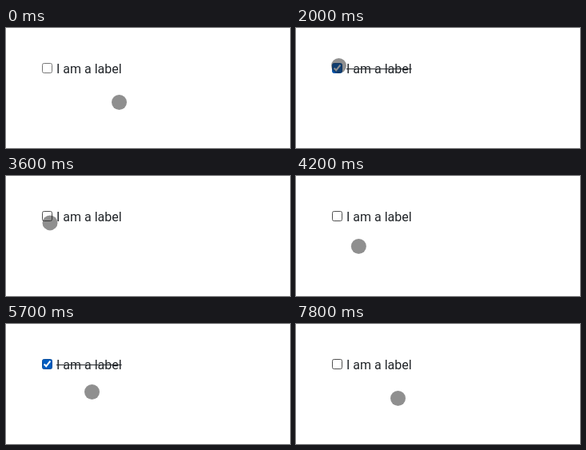
An HTML page for the animation above (8000 ms loop, 355 by 151 pixels).

```html
<!DOCTYPE html>
<html lang="en">
<head>
<meta charset="utf-8">
<title>Checkbox</title>
<style>
  html, body { margin: 0; width: 100%; height: 100%; overflow: hidden; background: #fff; }
  svg { position: absolute; left: 0; top: 0; width: 355px; height: 151px; }
  #label { position: absolute; left: 63px; top: 42px; font: 16px/19px Roboto, sans-serif; color: #212529; white-space: nowrap; }
</style>
</head>
<body>
<span id="label">I am a label</span>
<svg viewBox="0 0 355 151">
  <g transform="translate(45 44)">
    <rect id="box" x=".5" y=".5" width="12" height="12" rx="2"/>
    <path id="tick" d="M2.6 6.5l2.6 2.6L10.4 2.6" fill="none" stroke="#fff" stroke-width="2.08"/>
  </g>
  <circle id="touch" r="9.5" fill="#202020" fill-opacity=".5"/>
</svg>
<script>
const LOOP = 8000, STEP = 100;
const $ = id => document.getElementById(id);
const box = $('box'), tick = $('tick'), label = $('label'), touch = $('touch');

const home = { x: 141.5, y: 93.5 };
const low = { x: 76.5, y: 91.5 };

// The pointer glides to each point in the given number of steps, then rests.
const moves = [
  { at: 500, steps: 3, x: 81.5, y: 80.5 },
  { at: 900, steps: 3, x: 36.5, y: 43.5 },
  { at: 1200, steps: 2, x: 53.5, y: 47.5 },
  { at: 2100, steps: 1, ...low },
  { at: 2700, steps: 1, x: 56.5, y: 66.5 },
  { at: 2900, steps: 4, x: 47.5, y: 47.5 },
  { at: 3600, steps: 3, ...low },
  { at: 4200, steps: 6, x: 101.5, y: 51.5 },
  { at: 5400, steps: 2, x: 107.5, y: 85.5 },
  { at: 6100, steps: 6, x: 113.5, y: 52.5 },
  { at: 7100, steps: 3, x: 126.5, y: 88.5 },
  { at: 7800, steps: 1, x: 127.5, y: 93.5 }
];
const clicks = [2000, 3500, 5300, 7000];
const pressStart = 6800, pressEnd = 7000;

const ease = p => p * p * (3 - 2 * p);
const mix = (a, b, p) => a + (b - a) * p;

function touchAt(t) {
  const i = moves.findLastIndex(m => m.at <= t);
  if (i < 0) return home;
  const to = moves[i], from = moves[i - 1] || home;
  const step = Math.floor((t - to.at) / STEP) + 1;
  const p = ease(Math.min(1, step / to.steps));
  return { x: mix(from.x, to.x, p), y: mix(from.y, to.y, p) };
}

function draw(now) {
  const t = now % LOOP;
  const checked = clicks.filter(c => c <= t).length % 2 === 1;
  const pressed = t >= pressStart && t < pressEnd;
  const hovered = t >= clicks[0];
  const blue = pressed ? '#378cff' : '#005cc0';
  const edge = pressed ? blue : '#0b4f9f';
  const border = hovered ? '#4f4f4f' : '#767676';

  box.setAttribute('fill', checked ? blue : '#fff');
  box.setAttribute('stroke', checked ? edge : border);
  tick.style.display = checked ? '' : 'none';
  label.style.textDecoration = checked ? 'line-through' : 'none';

  const { x, y } = touchAt(t);
  touch.setAttribute('cx', x);
  touch.setAttribute('cy', y);
}

const origin = performance.now();
function frame() {
  draw(performance.now() - origin);
  requestAnimationFrame(frame);
}
frame();
</script>
</body>
</html>
```
